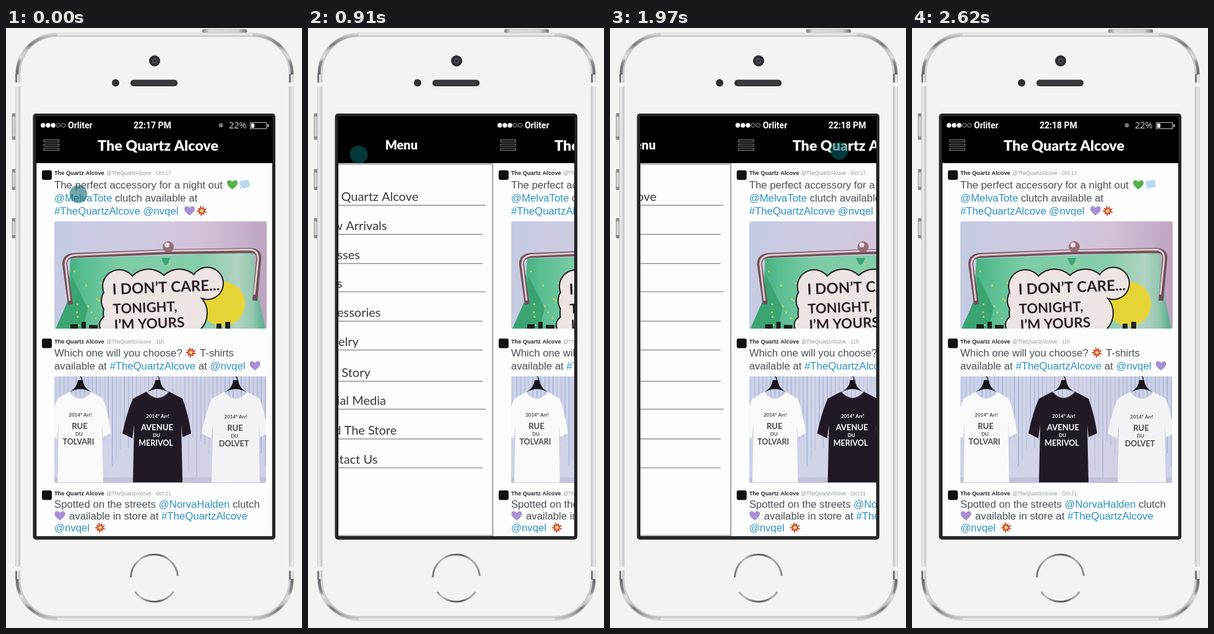
An HTML page with a canvas that plays this animation: 478x968 px, repeating every 2.9 s.

```html
<!DOCTYPE html>
<html lang="en">
<head>
<meta charset="utf-8">
<title>Sliding menu</title>
<style>
html, body { margin: 0; width: 100%; height: 100%; overflow: hidden; background: #f3f3f3; }
canvas { display: block; width: 478px; height: 968px; }
</style>
</head>
<body>
<canvas id="stage"></canvas>
<script>
const W = 478, H = 968, LOOP = 2900, SLIDE = 298;
const canvas = document.getElementById('stage');
const ratio = window.devicePixelRatio || 1;
canvas.width = W * ratio;
canvas.height = H * ratio;
const c = canvas.getContext('2d');

const SANS = '"Liberation Sans", Arial, sans-serif';
const LATO = 'Lato, sans-serif';
const ROBOTO = 'Roboto, sans-serif';
const SHOP = 'The Quartz Alcove', TAG = 'TheQuartzAlcove';
const LINK = '#2f92c4', INK = '#4b5156';

// ---- timing ----
function bezier(x1, y1, x2, y2) {
  const at = (a, b, u) => 3 * (1 - u) * (1 - u) * u * a + 3 * (1 - u) * u * u * b + u * u * u;
  return x => {
    if (x <= 0 || x >= 1) return x <= 0 ? 0 : 1;
    let lo = 0, hi = 1;
    for (let i = 0; i < 24; i++) {
      const mid = (lo + hi) / 2;
      if (at(x1, x2, mid) < x) lo = mid; else hi = mid;
    }
    return at(y1, y2, lo);
  };
}
const openEase = bezier(.28, .1, .38, 1);
const closeEase = bezier(.25, .3, .5, 1);
const handEase = bezier(.3, .1, .55, 1);
const outQuad = x => 1 - (1 - x) * (1 - x);
const linear = x => x;
const mix = (a, b, p) => a + (b - a) * p;

// Progress in n discrete steps, the first at time a and the last at time b.
function stepped(t, a, b, n, ease) {
  if (t < a) return 0;
  const k = Math.floor((t - a) / (b - a) * (n - 1) + .1) + 1;
  return ease(Math.min(1, k / n));
}

function slideAt(t) {
  return SLIDE * (stepped(t, 610, 1140, 10, openEase) - stepped(t, 1850, 2303, 9, closeEase));
}

function touchAt(t) {
  if (t < 1140) {
    const p = stepped(t, 60, 430, 7, handEase);
    return [mix(117, 82, p), mix(268, 204, p)];
  }
  if (t < 2030) {
    const u = stepped(t, 1140, 1670, 10, outQuad), v = 1 - u;
    return [v * v * 82 + 2 * u * v * 370 + u * u * 370, v * v * 204 + 2 * u * v * 270 + u * u * 198];
  }
  const p = stepped(t, 2030, 2360, 7, handEase);
  const q = stepped(t, 2450, 2620, 4, linear);
  return [mix(370, 412, p) + 21 * q, mix(198, 850, p) + 135 * q];
}

// ---- drawing helpers ----
function box(x, y, w, h, color) {
  c.fillStyle = color;
  c.fillRect(x, y, w, h);
}
function round(x, y, w, h, r, fill, stroke, lw) {
  c.beginPath();
  c.roundRect(x, y, w, h, r);
  if (fill) { c.fillStyle = fill; c.fill(); }
  if (stroke) { c.strokeStyle = stroke; c.lineWidth = lw || 1; c.stroke(); }
}
function disc(x, y, r, fill) {
  c.beginPath();
  c.arc(x, y, r, 0, Math.PI * 2);
  c.fillStyle = fill;
  c.fill();
}
function arc(x, y, r, from, to, stroke, lw) {
  c.beginPath();
  c.arc(x, y, r, from * Math.PI, to * Math.PI);
  c.strokeStyle = stroke;
  c.lineWidth = lw;
  c.stroke();
}
function text(s, x, y, font, color, align) {
  c.font = font;
  c.fillStyle = color;
  c.textAlign = align || 'left';
  c.fillText(s, x, y);
}
function fade(x0, y0, x1, y1, ...stops) {
  const g = c.createLinearGradient(x0, y0, x1, y1);
  stops.forEach(([p, color]) => g.addColorStop(p, color));
  return g;
}
function shape(d, fill, stroke, lw) {
  const p = new Path2D(d);
  if (fill) { c.fillStyle = fill; c.fill(p); }
  if (stroke) { c.strokeStyle = stroke; c.lineWidth = lw; c.stroke(p); }
}
function clipped(x, y, w, h, r, draw) {
  c.save();
  c.beginPath();
  c.roundRect(x, y, w, h, r);
  c.clip();
  draw();
  c.restore();
}
function random(seed) {
  return () => (seed = (seed * 16807) % 2147483647) / 2147483647;
}

// ---- phone ----
function drawPhone() {
  box(0, 0, W, H, '#f3f3f3');
  const key = fade(9, 0, 16, 0, [0, '#8f8f92'], [.45, '#dededf'], [1, '#a6a6a9']);
  [[137, 44], [227, 35], [306, 34]].forEach(([y, h]) => {
    round(9.5, y, 6, h, 2, key);
    box(10, y + 1, 5, 5, '#8a8a8d');
    box(10, y + h - 6, 5, 5, '#8a8a8d');
  });
  round(317, 2, 72, 6, 2, fade(317, 0, 389, 0, [0, '#777'], [.15, '#ddd'], [.8, '#d2d2d4'], [1, '#6c6c6c']), '#aaa', .8);

  round(15, 7.5, 450, 949, 67, '#d2d3d6');
  round(18, 10, 444, 944, 64.5, null, '#e9e9eb', 3);
  round(22.5, 13.5, 435, 936, 60, '#f3f3f3', '#c6c6c9', 1.5);
  // Reflections run round each corner.
  const glint = [[0, '#67676b'], [.3, '#8c8c90'], [.42, '#e0e0e2'], [.6, '#c2c2c5'], [.72, '#77777b'], [.88, '#a5a5a8'], [1, '#d5d5d8']];
  [[82, 75, 1], [398, 75, 1.5], [398, 889, 0], [82, 889, .5]].forEach(([x, y, from]) => {
    const top = y < H / 2;
    arc(x, y, 64, from, from + .5, fade(0, y, 0, top ? y - 66 : y + 66, ...glint), 4.5);
  });
  [15, 457].forEach(x => {
    box(x, 74, 3, 14, '#77777b');
    box(x, 876, 3, 14, '#77777b');
    [88, 869].forEach(y => box(x, y, 8, 6, '#f7f7f7'));
  });

  disc(240, 53, 9, '#2d2d31');
  disc(240, 53, 4.5, '#4a4a5a');
  disc(240, 53, 2, '#24242c');
  disc(177, 88.5, 6, '#303033');
  round(201, 83.5, 76, 10.5, 5, '#2f2f35');
  for (let i = 0; i < 34; i++) for (let j = 0; j < 3; j++)
    box(205 + i * 2 + (j % 2), 86 + j * 2.3, 1, 1, '#66666e');

  const ring = fade(200, 0, 280, 0, [0, '#6b6b6e'], [.2, '#c2c2c5'], [.4, '#707073'], [.6, '#606064'], [.8, '#b0b0b3'], [1, '#808083']);
  arc(239.5, 887.5, 38, 1.01, 1.97, ring, 3);
  arc(239.5, 887.5, 38, .2, .8, ring, 3);

  round(43.5, 138, 391.5, 687.5, 5, '#27282b');
  box(48, 142, 383, 679, '#0c0c0d');
}

// ---- emoji ----
function heart(x, y, color) {
  c.save();
  c.translate(x, y);
  shape('M0 7.5C-4 4-8.5 1-8.5-3.3C-8.5-8-2.5-9 0-4.4C2.5-9 8.5-8 8.5-3.3C8.5 1 4 4 0 7.5Z', color);
  c.restore();
}
function cloud(x, y) {
  [[-3, -1, 5], [3, -2, 5], [5, 2, 3.5], [-1, 2, 4.5], [-6, 6, 1.5]]
    .forEach(([dx, dy, r]) => disc(x + dx, y + dy, r, '#b8d8ee'));
}
function burst(x, y) {
  [[9.5, '#c23325'], [5.8, '#ef8a35'], [3.4, '#fbe6b0']].forEach(([r, color]) => {
    c.beginPath();
    for (let i = 0; i < 18; i++) {
      const a = i * Math.PI / 9 + .3, d = i % 2 ? r * .48 : r * (i % 4 ? .85 : 1);
      c.lineTo(x + d * Math.cos(a), y + d * Math.sin(a));
    }
    c.fillStyle = color;
    c.fill();
  });
}

// ---- feed ----
function byline(y, when) {
  round(58, y - 7.5, 16, 15.5, 3, '#111');
  text(SHOP, 78, y, 'bold 9.2px ' + SANS, '#25292c');
  text('@' + TAG + ' · ' + when, 162, y, '8.3px ' + SANS, '#8b98a3');
}
// Words that start with @ or # are links.
function line(s, x, y) {
  c.font = '16.75px ' + SANS;
  s.split(/([@#]\w+)/).forEach(part => {
    text(part, x, y, c.font, /^[@#]/.test(part) ? LINK : INK);
    x += c.measureText(part).width;
  });
}

function drawClutch() {
  box(78, 312, 343, 173, fade(78, 318, 421, 350, [0, '#c5cbe2'], [.45, '#d0cae0'], [.7, '#d3c2d8'], [1, '#bda5c0']));
  shape('M104 372L400 362L405 420L419 485H80L100 440Z',
    fade(85, 0, 415, 0, [0, '#3aa676'], [.12, '#58bd90'], [.3, '#7dcca8'], [.7, '#86cdac'], [.88, '#b2d3c2'], [.95, '#93c7b0'], [1, '#5fae90']));
  shape('M82 485L100 440L106 400L132 452L124 485Z', '#3aa473');
  const rnd = random(77);
  for (let i = 0; i < 26; i++) disc(110 + rnd() * 240, 380 + rnd() * 100, 1.5, '#cfd84e');
  shape('M251 371Q258 394 265 371Z', '#3fa577');
  disc(350, 445, 36, '#e6d335');
  shape('M104 446L95 382Q94 368 110 367L262 361L396 359Q410 360 408 374L402 440', null, '#6f5058', 8);
  shape('M103 440L96 381Q96 369 110 366.5L262 359.5L396 357.5Q408 360 407 374L401 430', null, '#dfcbd1', 3);
  disc(262, 353, 9, '#94707a');
  disc(260, 350, 4, '#f0dfe0');
  const lobes = [[183, 417, 26], [230, 425, 35], [280, 425, 35], [325, 412, 25], [288, 460, 36],
    [190, 460, 32], [166, 479, 14], [240, 470, 45], [180, 440, 25]];
  lobes.forEach(([x, y, r]) => disc(x, y, r + 2, '#20181c'));
  lobes.forEach(([x, y, r]) => disc(x, y, r, '#ece5e3'));
  [[104, 478, 12], [122, 474, 7], [134, 479, 14], [340, 477, 8], [354, 474, 8]]
    .forEach(([x, y, w]) => box(x, y, w, 11, '#1d2320'));
  [['I DON’T CARE...', 172, 430, 24], ['TONIGHT,', 173, 461, 22], ['I’M YOURS', 175, 487, 22.5]].forEach(([s, x, y, size]) => {
    c.save();
    c.translate(x, y);
    c.rotate(-.04);
    text(s, 0, 0, 'bold ' + size + 'px ' + LATO, '#2a1f27');
    c.restore();
  });
}

function shirt(x, scale, fill, ink, words, dy) {
  shape(`M${x} 562Q${x + 5} 566 ${x} 572`, null, '#222', 1.6);
  shape(`M${x - 18} 588Q${x - 4} 579 ${x - 4} 568H${x + 4}Q${x + 4} 579 ${x + 18} 588Q${x} 577 ${x - 18} 588Z`, '#17151a');
  c.save();
  c.translate(x, 0);
  c.scale(scale, 1);
  shape('M-19 587Q0 608 19 587L40 598Q50 625 54 654L40 660L38 640L40 733H-40L-38 640L-41 662L-57 654Q-50 620-40 598Z', fill);
  shape('M-19 587Q0 608 19 587', null, ink === '#fff' ? '#3c343f' : '#d3d3de', 1.5);
  c.restore();
  const rows = [['2014º Arr!', 627, 8], [words[0], 647, 13], ['DU', 658, 8], [words[1], 672, 12.5]];
  rows.forEach(([s, y, size], i) => text(s, x - i, y + dy, 'bold ' + size + 'px ' + LATO, ink, 'center'));
}

function drawShirts() {
  box(78, 562, 343, 172, fade(78, 0, 421, 0, [0, '#ccd2e8'], [.5, '#d4d4e6'], [1, '#cdcfe4']));
  const rnd = random(31);
  for (let x = 80; x < 421; x += 6.5) {
    c.globalAlpha = .25 + rnd() * .6;
    box(x, 562, 1.5, 70 + rnd() * 102, '#98a9d3');
  }
  c.globalAlpha = 1;
  box(78, 725, 343, 9, 'rgba(190,190,212,.7)');
  shirt(120, .92, '#fafafb', '#4a4a52', ['RUE', 'TOLVARI'], 0);
  shirt(245, 1, '#211a25', '#fff', ['AVENUE', 'MERIVOL'], 2);
  shirt(371, .97, '#f3f3f5', '#4a4a52', ['RUE', 'DOLVET'], 3);
}

function drawFeed() {
  box(49, 218, 400, 603, '#fdfdfe');
  byline(237, 'Oct 17');
  line('The perfect accessory for a night out', 78, 259);
  heart(365.5, 253, '#57b04c');
  cloud(385, 252);
  line('@MelvaTote clutch available at', 78, 279.5);
  line('#' + TAG + ' @nvqel', 78, 301);
  heart(296.5, 295, '#a98fd6');
  burst(316, 295);
  clipped(78, 312, 343, 173, 3, drawClutch);

  byline(508.5, '11h');
  line('Which one will you choose?', 78, 530);
  burst(298.5, 523.5);
  line('T-shirts', 313, 530);
  line('available at #' + TAG + ' at @nvqel', 78, 550.5);
  heart(402, 545, '#a98fd6');
  clipped(78, 562, 342, 172, 3, drawShirts);

  byline(753.5, 'Oct 21');
  line('Spotted on the streets @NorvaHalden clutch', 78, 773.5);
  heart(87, 787, '#a98fd6');
  line('available in store at #' + TAG, 102, 792.5);
  line('@nvqel', 78, 812);
  burst(152, 806);
}

function drawHeader(clock) {
  box(48.5, 142, 400, 76, '#000');
  for (let i = 0; i < 5; i++) {
    if (i < 3) disc(59.7 + i * 8.25, 157, 3.7, '#fff');
    else arc(59.7 + i * 8.25, 157, 3.2, 0, 2, '#aaa', 1);
  }
  text('Orliter', 100, 162, 'bold 14px ' + ROBOTO, '#fff');
  text(clock, 206, 162, 'bold 14px ' + ROBOTO, '#fff');
  disc(347, 157, 3.5, '#777');
  text('22%', 360, 162, '14.5px "Open Sans", sans-serif', '#d8d8d8');
  c.strokeStyle = '#c4c4c4';
  c.lineWidth = 1;
  c.strokeRect(394.5, 152.5, 26, 10);
  box(396, 154, 5, 7, '#fff');
  box(422, 155, 2, 5, '#c4c4c4');
  c.strokeStyle = '#8f8f8f';
  for (let i = 0; i < 3; i++) c.strokeRect(61, 180.5 + i * 6.8, 24.5, 3.4);
  text(SHOP, 245.5, 198, '900 23.3px ' + LATO, '#fff', 'center');
}

// ---- menu, placed as when fully open ----
const ITEMS = [[SHOP, 286], ['New Arrivals', 333], ['Dresses', 380], ['Tops', 425.5], ['Accessories', 473],
  ['Jewelry', 519.5], ['Our Story', 570], ['Social Media', 615], ['Find The Store', 663], ['Contact Us', 709.5]];

function drawMenu() {
  box(50, 142, 298, 76, '#000');
  box(50, 218, 297, 603, '#fdfdfe');
  c.strokeStyle = '#aeaeb1';
  c.lineWidth = 2.4;
  c.strokeRect(51, 219.5, 295.4, 599.5);
  text('Menu', 199, 196, '900 20px ' + LATO, '#fff', 'center');
  ITEMS.forEach(([label, y], i) => {
    text(label, 63, y - 7, '20px ' + LATO, '#3a3a3c');
    box(i === 0 || i === 3 || i === 7 ? 63 : 58, y - 1, 272, 2, '#adadb0');
  });
}

function draw(t) {
  const slide = slideAt(t);
  c.setTransform(ratio, 0, 0, ratio, 0, 0);
  drawPhone();
  clipped(49, 143, 381, 677, 0, () => {
    box(49, 143, 382, 677, '#fdfdfe');
    c.translate(slide, 0);
    drawFeed();
    drawHeader(t < 1140 ? '22:17 PM' : '22:18 PM');
    c.translate(-SLIDE, 0);
    drawMenu();
  });
  if (t < 2620) disc(...touchAt(t), 14.5, 'rgba(8,98,102,.57)');
}

const start = performance.now();
function tick() {
  draw((performance.now() - start) % LOOP);
  requestAnimationFrame(tick);
}
tick();
</script>
</body>
</html>
```
